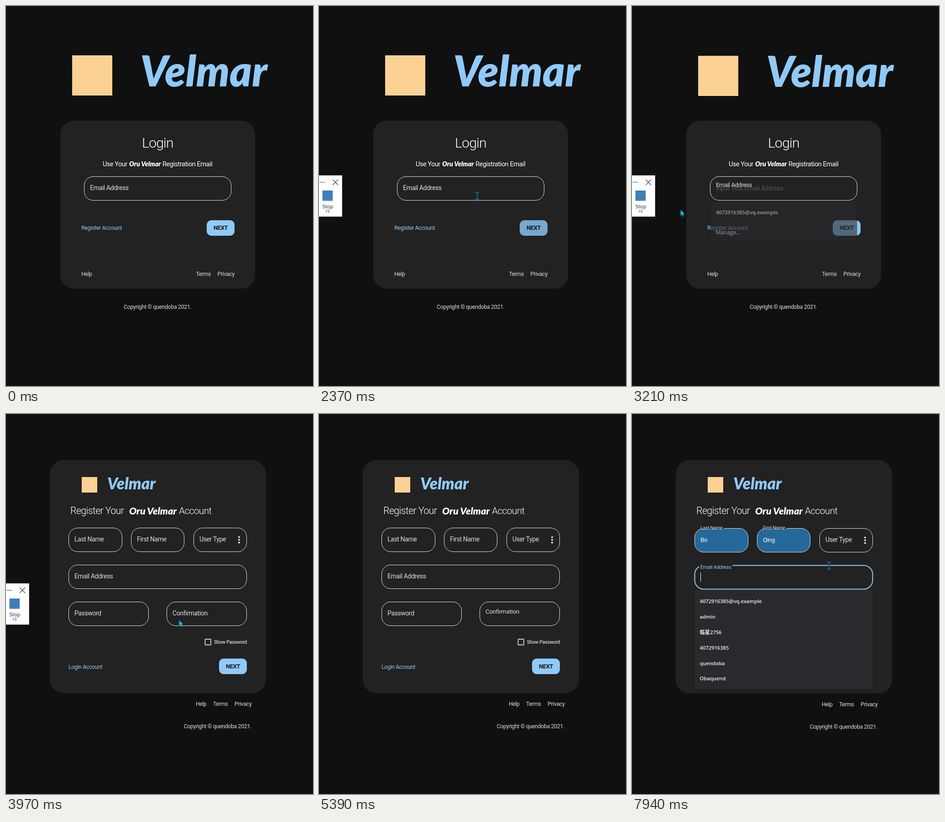
These frames come from a looping animation (673 px wide and 832 px high, 8 s). An HTML page:

```html
<!DOCTYPE html>
<html lang="en">
<head>
<meta charset="utf-8">
<title>Login and registration</title>
<style>
  html, body { margin: 0; width: 100%; height: 100%; overflow: hidden; background: #101010; }
  svg { display: block; width: 100%; height: 100%; }
  text { font-family: Roboto, "Noto Sans", sans-serif; letter-spacing: -.03em; white-space: pre; }
  .brand { font-family: Lato, sans-serif; font-weight: 900; font-style: italic; letter-spacing: 0; }
  .menu { font-family: "Open Sans", "Noto Sans", "Noto Sans CJK SC", sans-serif; letter-spacing: 0; }
  .light { font-weight: 300; }
  .bold { font-weight: 700; }
  .semi { font-weight: 600; }
</style>
</head>
<body>
<svg id="stage" viewBox="0 0 673 832"></svg>
<script>
const LOOP = 8000;
const NEVER = 1e9;
const BLUE = '#90caf9', CARD = '#222222', TEXT = '#dedede', PEACH = '#fbd293';
const stage = document.getElementById('stage');

function set(node, attrs) {
  for (const key in attrs) node.setAttribute(key, attrs[key]);
  return node;
}
function add(parent, tag, attrs) {
  return parent.appendChild(set(document.createElementNS('http://www.w3.org/2000/svg', tag), attrs));
}
function rect(parent, x, y, width, height, rx, fill, more) {
  return add(parent, 'rect', { x, y, width, height, rx, fill, ...more });
}
// y is the middle of the capitals
function write(parent, x, y, size, string, fill = TEXT, cls = '') {
  const node = add(parent, 'text', { x, y: y + size * .355, 'font-size': size, fill, class: cls });
  node.textContent = string;
  return node;
}
const clamp = v => Math.max(0, Math.min(1, v));
const mix = (a, b, p) => a + (b - a) * p;
const ramp = (t, start, time = 200) => 1 - (1 - clamp((t - start) / time)) ** 3;
const within = (t, [a, b]) => t >= a && t < b;
const show = (node, on) => node.setAttribute('opacity', +on);

function button(parent, x, y) {
  const body = rect(parent, x, y, 61, 34, 10, BLUE);
  write(parent, x + 15, y + 16.5, 13, 'NEXT', '#17191c', 'bold');
  return body;
}

const fields = [];
function field(parent, x, y, w, name, opts = {}) {
  const f = { x, y, up: [NEVER, NEVER], focus: [NEVER, NEVER], fillAt: NEVER, ...opts };
  f.box = rect(parent, x + .5, y + .5, w - 1, 52, 19.5, 'none', { stroke: '#e6e6e6' });
  f.gap = rect(parent, x + 10, y - 1, 10, 4, 0, CARD);
  f.hint = write(parent, x + 13, y + 26, 14.1, f.placeholder || '', '#ffffff');
  f.entry = write(parent, x + 13, y + 25, 13.6, f.value || '', '#ffffff');
  f.label = write(parent, 0, 0, 14.1, name);
  f.length = f.label.getComputedTextLength();
  f.caret = rect(parent, x + 13, y + 16, 1, 20, 0, '#ffffff');
  fields.push(f);
}
function drawField(f, t) {
  const p = ramp(t, f.up[0]) - ramp(t, f.up[1]);
  const scale = mix(1, .75, p);
  const focused = within(t, f.focus);
  const filled = t >= f.fillAt;
  set(f.box, {
    stroke: focused ? BLUE : '#e6e6e6',
    'stroke-width': focused ? 2 : 1,
    fill: filled ? '#25689a' : 'none'
  });
  set(f.label, {
    transform: `translate(${f.x + 13} ${mix(f.y + 25, f.y - 1, p)}) scale(${scale})`,
    fill: focused ? BLUE : TEXT
  });
  set(f.gap, { width: f.length * scale + 6, height: filled ? 2.2 : 4 });
  show(f.gap, p > .5);
  show(f.entry, filled);
  set(f.hint, { opacity: f.placeholder ? Math.min(.5, p * .8) : 0 });
  show(f.caret, focused && Math.floor((t - f.focus[0]) / 500) % 2 === 0);
}

// Login page
const login = add(stage, 'g', {});
const banner = add(login, 'g', {});
rect(banner, 145, 108, 88, 88, 0, PEACH);
add(banner, 'text', { x: 294, y: 176, 'font-size': 92, fill: BLUE, class: 'brand' }).textContent = 'Velmar';
rect(login, 119, 251, 427, 368, 30, CARD);
write(login, 298, 299.5, 30.3, 'Login', '#ffffff', 'light');
write(login, 212, 345.5, 14.4, 'Use Your', '#ffffff');
write(login, 270, 346, 14.3, 'Oru Velmar', '#ffffff', 'brand');
write(login, 343, 345.5, 14.5, 'Registration Email', '#ffffff');
field(login, 171, 373, 323, 'Email Address', {
  up: [2440, 3140], focus: [2440, 3140], placeholder: 'Input Your Email Address'
});
write(login, 165, 485.5, 12.5, 'Register Account', BLUE);
const next = button(login, 440, 469);
write(login, 165, 587, 12.2, 'Help');
write(login, 416.5, 587, 12.2, 'Terms');
write(login, 463.5, 587, 12.4, 'Privacy');
write(login, 258, 658.5, 12.4, 'Copyright © quendoba 2021.');

// Registration page
const register = add(stage, 'g', {});
const panel = rect(register, 96, 101, 474, 510, 30, CARD);
rect(register, 166, 138, 34, 34, 0, PEACH);
add(register, 'text', { x: 222, y: 165, 'font-size': 35, fill: BLUE, class: 'brand' }).textContent = 'Velmar';
write(register, 141, 211.5, 21.4, 'Register Your', '#ffffff', 'light');
write(register, 270, 212, 21.4, 'Oru Velmar', '#ffffff', 'brand');
write(register, 379, 211.5, 20.9, 'Account', '#ffffff', 'light');
const form = add(register, 'g', {});
field(form, 137, 249, 118, 'Last Name', { up: [6235, NEVER], focus: [6235, 6900], fillAt: 6900, value: 'Bo' });
field(form, 274, 249, 117, 'First Name', { up: [6900, NEVER], fillAt: 6900, value: 'Qing' });
field(form, 411, 249, 117, 'User Type');
for (const cy of [269.5, 275.5, 281.5]) add(form, 'circle', { cx: 511, cy, r: 2.1, fill: TEXT });
field(form, 137, 330, 391, 'Email Address', { up: [7855, NEVER], focus: [7855, NEVER] });
field(form, 137, 411, 176, 'Password');
field(form, 352, 411, 176, 'Confirmation', { up: [4130, 5300], focus: [4130, 5300] });
write(form, 137, 554, 12.3, 'Login Account', BLUE);
button(form, 467, 535.5);
write(form, 416, 635, 12.2, 'Help');
write(form, 454, 635, 12.2, 'Terms');
write(form, 501, 635, 12.4, 'Privacy');
write(form, 389.5, 684, 12.4, 'Copyright © quendoba 2021.');
rect(register, 436.5, 493, 12.5, 12.5, 1, 'none', { stroke: '#cfcfcf', 'stroke-width': 1.8 });
write(register, 456, 499, 10.7, 'Show Password', '#ffffff');

// Suggestion menus
function menu(x, y, w, h) {
  const g = add(stage, 'g', {});
  rect(g, x - 1, y, w + 2, h + 2, 4, '#1b1b1c');
  rect(g, x, y, w, h, 3, '#292a2d');
  return g;
}
const line = (g, x, y, w) => rect(g, x, y, w, 1, 0, '#3c3d41');
const option = (g, x, y, string, cls = 'semi', size = 11.2) =>
  write(g, x, y, size, string, '#f1f1f1', 'menu ' + cls);

const mailMenu = menu(173, 429, 319.5, 85);
option(mailMenu, 184, 452.5, '4072916385@vq.example');
line(mailMenu, 173, 476, 319.5);
option(mailMenu, 184, 496, 'Manage...', '', 11.8);

const nameMenu = menu(137, 304, 181, 163);
const firstRow = rect(nameMenu, 137, 311, 181, 55, 0, '#3f4042');
option(nameMenu, 148.5, 329, 'Bo');
option(nameMenu, 148.5, 349, 'Qing Bo', '');
option(nameMenu, 148.5, 383, '柏');
option(nameMenu, 148.5, 403.5, '柏青', '');
line(nameMenu, 137, 428, 181);
option(nameMenu, 148.5, 448.5, 'Manage...', '', 11.8);

const userMenu = menu(137, 385, 391, 218);
['4072916385@vq.example', 'admin', '临星2756', '4072916385', 'quendoba', 'Obaquend']
  .forEach((string, i) => option(userMenu, 148.5, 410 + i * 33.9, string));

// Recorder window at the left edge
const recorder = add(stage, 'g', {});
rect(recorder, -5, 371, 55.5, 90, 0, '#ffffff', { stroke: '#c8c8c8', 'stroke-width': .6 });
rect(recorder, 1, 385, 13, 1.5, 0, '#5b93c5');
add(recorder, 'path', { d: 'M30 380l12 12M42 380l-12 12', stroke: '#3a3a3a', 'stroke-width': 1.1 });
rect(recorder, 7.5, 404, 22.5, 22.5, 0, '#3f7eb9');
write(recorder, 7.5, 439, 11.2, 'Stop', '#222222', 'menu');
write(recorder, 14.5, 450.5, 8.3, 'F8', '#44586c', 'menu');

// Pointer
const pointer = add(stage, 'g', {});
const arrow = add(pointer, 'path', {
  d: 'M0 0V13L3 10.4L5.2 15L7.4 14L5.2 9.6H9.6Z', fill: '#1cb4f4', stroke: '#0b3a50', 'stroke-width': .5
});
const beam = add(pointer, 'g', { fill: 'none' });
const beamShape = 'M-4 -7.5H-1.5L0 -6.5L1.5 -7.5H4M0 -6.5V6.5M-4 7.5H-1.5L0 6.5L1.5 7.5H4';
add(beam, 'path', { d: beamShape, stroke: '#0d2a38', 'stroke-width': 2.6 });
add(beam, 'path', { d: beamShape, stroke: '#2b82a8', 'stroke-width': 1.3 });

const ARROW = 0, BEAM = 1, NONE = 2;
const path = [
  [0, 6, 449, NONE], [1200, 6, 449, ARROW], [1410, 466, 583, ARROW], [1810, 466, 583, ARROW],
  [2060, 472, 490, ARROW], [2230, 465, 478, ARROW], [2300, 420, 440, ARROW], [2370, 347, 416, BEAM],
  [2440, 335, 410, BEAM], [2500, 200, 415, BEAM], [2580, 109, 430, ARROW], [2800, 94, 440, ARROW],
  [3140, 106, 446, ARROW], [3210, 106, 446, ARROW], [3420, 195, 486, ARROW], [3700, 195, 486, ARROW],
  [4060, 440, 440, BEAM], [4250, 450, 470, BEAM], [4380, 450, 470, BEAM], [4450, 330, 385, ARROW],
  [4520, 187, 336, BEAM], [4590, 120, 326, ARROW], [4800, 54, 360, NONE], [5730, 103, 420, ARROW],
  [5950, 150, 330, ARROW], [6100, 180, 290, BEAM], [6500, 187, 288, BEAM], [6640, 189, 313, ARROW],
  [7320, 189, 313, ARROW], [7600, 300, 350, BEAM], [7860, 432, 332, BEAM], [LOOP, 432, 332, BEAM]
];
function movePointer(t) {
  const i = path.findIndex(k => k[0] > t);
  const [t0, x0, y0, kind] = path[i - 1];
  const [t1, x1, y1] = path[i];
  const p = (t - t0) / (t1 - t0);
  set(pointer, { transform: `translate(${mix(x0, x1, p)} ${mix(y0, y1, p)})` });
  show(arrow, kind === ARROW);
  show(beam, kind === BEAM);
}

function draw(t) {
  const switched = t >= 3500;
  show(login, !switched);
  set(register, { opacity: switched ? ramp(t, 3500) : 0 });
  set(banner, { transform: `translate(0 ${t >= 2440 ? 1 : 0})` });

  const hover = ramp(t, 2040) - ramp(t, 2370, 250);
  const shade = [[144, 118], [202, 168], [249, 209]].map(([a, b]) => Math.round(mix(a, b, hover)));
  set(next, { fill: `rgb(${shade})` });

  const shift = within(t, [4130, 5300]) || t >= 6235 ? 1 : 0;
  set(form, { transform: `translate(0 ${shift})` });
  set(panel, { height: 510 + shift });
  fields.forEach(f => drawField(f, t));

  // The closing menu fades while the label drops back
  set(mailMenu, { opacity: t < 2500 ? 0 : t < 3140 ? 1 : clamp(1 - (t - 3140) / 180) });
  show(nameMenu, within(t, [6290, 6900]));
  show(firstRow, t >= 6640);
  show(userMenu, t >= 7900);
  show(recorder, within(t, [330, 5340]));
  movePointer(t);
}

const start = performance.now();
function tick() {
  draw((performance.now() - start) % LOOP);
  requestAnimationFrame(tick);
}
tick();
</script>
</body>
</html>
```
